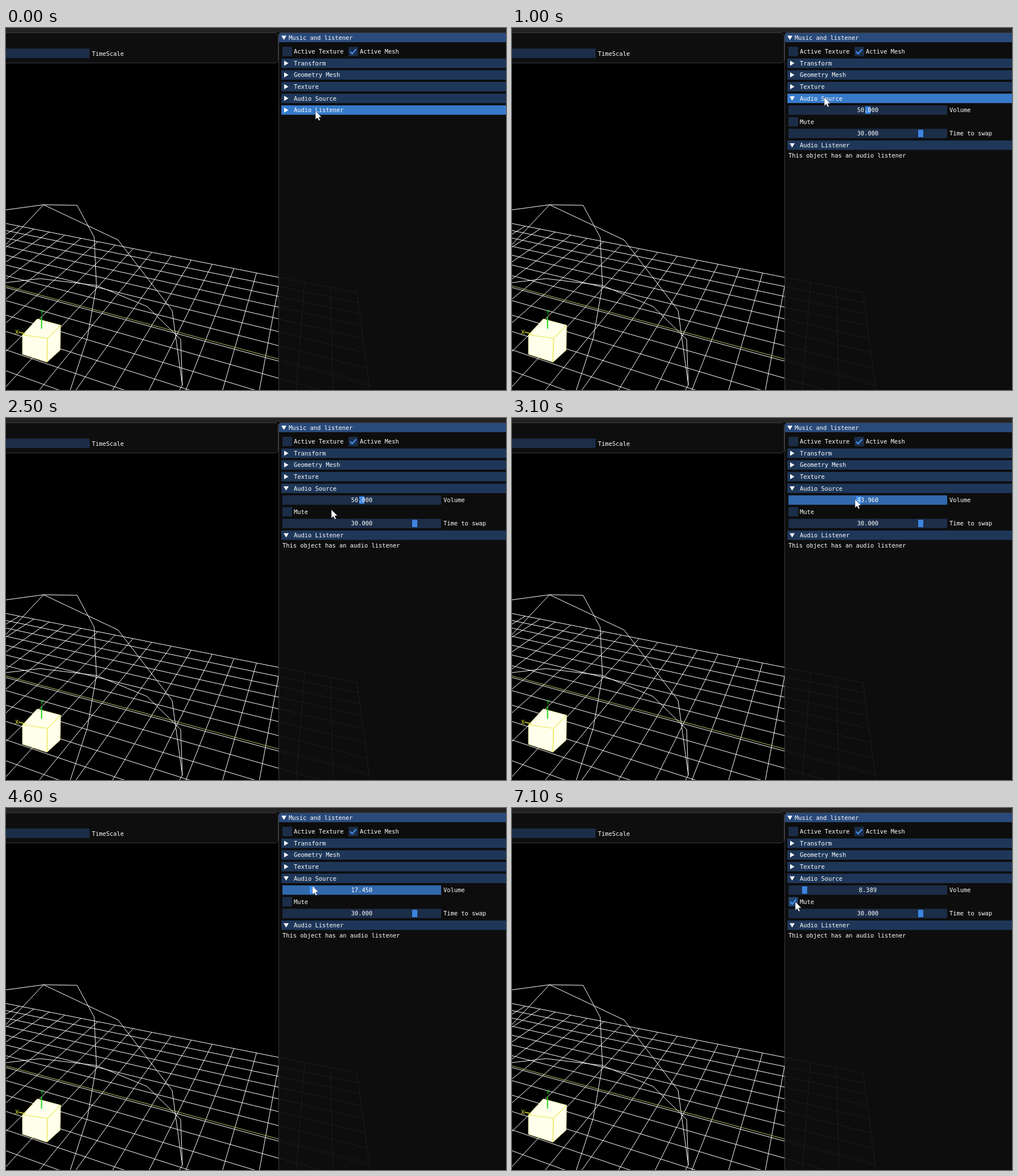
An HTML page with a canvas that plays this animation: 879 px wide and 637 px high, repeating every 7.2 s.

```html
<!DOCTYPE html>
<html lang="en">
<head>
<meta charset="utf-8">
<title>Audio inspector</title>
<style>
html, body { margin: 0; width: 100%; height: 100%; overflow: hidden; background: #000; }
canvas { display: block; }
</style>
</head>
<body>
<canvas id="stage" width="879" height="637"></canvas>
<script>
const ctx = document.getElementById('stage').getContext('2d');
const LOOP = 7200, STEP = 100;
const COLOR = {
  header: '#1e3759', headerHover: '#367ac9',
  frame: '#1c2d48', frameHover: '#23456d', frameActive: '#3169ac',
  grab: '#3d85e0', accent: '#4296fa', border: '#3c3c43'
};
const ROW = 20.6, BAR = 16.6, FIRST_ROW = 62;
const rowY = i => FIRST_ROW + i * ROW;

// Places the pointer visits; it moves evenly from one to the next.
const stops = [
  { at: 0, x: 544, y: 146 },
  { at: 400, x: 544, y: 146 },
  { at: 800, x: 549, y: 122 },
  { at: 1100, x: 549, y: 122 },
  { at: 1900, x: 491, y: 187 },
  { at: 2900, x: 626, y: 144 },
  { at: 3200, x: 591.6, y: 142.5 },
  { at: 4400, x: 538.592, y: 137 },
  { at: 4600, x: 538.592, y: 137 },
  { at: 4750, x: 514.399, y: 138 },
  { at: 4900, x: 514.399, y: 138 },
  { at: 5400, x: 496, y: 160 },
  { at: 5900, x: 498, y: 165 },
  { at: LOOP, x: 498, y: 165 }
];
const TIMES = { listener: 200, source: 900, drag: 2900, release: 4900, mute: 5900 };
const SLIDER = { zero: 492, unit: 2.67, lag: 55 };

function pointer(t) {
  const i = Math.max(1, stops.findIndex(s => s.at >= t));
  const a = stops[i - 1], b = stops[i];
  const k = (t - a.at) / (b.at - a.at);
  return { x: a.x + (b.x - a.x) * k, y: a.y + (b.y - a.y) * k };
}

// The dragged value trails the pointer and stays where it was let go.
function volumeAt(t) {
  if (t < TIMES.drag) return 50;
  const { x } = pointer(Math.min(t, TIMES.release) - SLIDER.lag);
  return Math.min(50, (x - SLIDER.zero) / SLIDER.unit);
}

function rect(x, y, w, h, color) {
  ctx.fillStyle = color;
  ctx.fillRect(x, y, w, h);
}

function trace(points) {
  ctx.beginPath();
  points.forEach(([x, y]) => ctx.lineTo(x, y));
}

function line(points, color = '#fff', width = 1) {
  trace(points);
  ctx.strokeStyle = color;
  ctx.lineWidth = width;
  ctx.stroke();
}

function shape(points, color) {
  trace(points);
  ctx.fillStyle = color;
  ctx.fill();
}

function text(str, x, cy, color = '#fff', align = 'left') {
  ctx.font = '10.4px "DejaVu Sans Mono", monospace';
  ctx.textAlign = align;
  ctx.fillStyle = color;
  ctx.fillText(str, x, cy + 3.7);
}

// Perspective of the floor: its far right corner and two vanishing points.
function ground(u, v) {
  const a = u * 0.0386, b = v * 0.02212, w = 1 - a + b;
  return [(617 - a * 558 - b * 1555) / w, (466 - a * 25 + b * 36.6) / w];
}

function drawFloor() {
  for (let i = 0; i <= 20; i++) {
    line([ground(0, i), ground(20, i)]);
    line([ground(i, 0), ground(i, 30)]);
  }
  line([ground(6.87, 0), ground(6.87, 30)], '#c4c46a');
}

function drawSphere() {
  line([[0, 320], [66, 311], [125, 312], [155, 368], [159, 453], [143, 545], [113, 637]]);
  line([[0, 381], [66, 311], [197, 373], [292, 497], [310, 628], [307, 548],
    [248, 490], [159, 453], [60, 441], [0, 448]]);
  line([[310, 628], [305, 637]]);
}

function drawCube() {
  const left = [29, 540], right = [96, 523], near = [73, 546], base = [72, 588];
  const outline = [[55, 512], right, [95, 567], base, [29, 574], left, [55, 512]];
  shape(outline, '#ffffec');
  line(outline, '#f6f6a0');
  line([left, near, right], '#eeee78', 1.5);
  line([near, base], '#eeee78', 2);
  line([[62.5, 508], [62.5, 529]], '#20d020', 2);
  line([[22, 535], [34, 538]], '#dede30', 1.5);
  text('Y', 60, 500, '#20d020');
  text('X', 16, 535, '#e6e63c');
}

function arrow(cy, open, x = 492.5) {
  shape(open ? [[x - 4.5, cy - 3.5], [x + 4.5, cy - 3.5], [x, cy + 4]]
    : [[x - 3.5, cy - 4.5], [x + 4, cy], [x - 3.5, cy + 4.5]], '#fff');
}

const bar = (x, cy, w, color) => rect(x, cy - BAR / 2, w, BAR, color);

function header(label, cy, open, hover) {
  bar(484, cy, 395, hover ? COLOR.headerHover : COLOR.header);
  arrow(cy, open);
  text(label, 506, cy);
}

function checkbox(label, x, cy, checked, hover) {
  bar(x, cy, 17, hover ? COLOR.frameHover : COLOR.frame);
  if (checked) line([[x + 3, cy], [x + 6.5, cy + 4], [x + 13.5, cy - 4]], COLOR.accent, 2.2);
  text(label, x + 20, cy);
}

function slider(label, cy, value, grabX, hover, active) {
  bar(486, cy, 279, active ? COLOR.frameActive : hover ? COLOR.frameHover : COLOR.frame);
  rect(grabX - 4.5, cy - 6.5, 9, 13, active ? COLOR.accent : COLOR.grab);
  text(value.toFixed(3), 625.5, cy, '#fff', 'center');
  text(label, 769, cy);
}

function drawWindows() {
  ctx.beginPath();
  ctx.roundRect(-20, 8.5, 498.5, 53, 6);
  ctx.fillStyle = 'rgba(15,15,15,.94)';
  ctx.fill();
  ctx.strokeStyle = COLOR.border;
  ctx.lineWidth = 1;
  ctx.stroke();
  bar(0, 44.5, 147, COLOR.frame);
  text('TimeScale', 151, 45);

  rect(479, 9, 400, 628, 'rgba(14,14,14,.94)');
  rect(480, 9, 399, 16, '#294a7a');
  line([[479.5, 637], [479.5, 12], [482, 8.5], [879, 8.5]], COLOR.border);
  rect(0, 0, 879, 8, '#232323');
  arrow(17, true, 488.5);
  text('Music and listener', 497, 17);
}

function drawInspector(t, mouse) {
  const dragging = t >= TIMES.drag && t < TIMES.release;
  const sourceOpen = t >= TIMES.source, listenerOpen = t >= TIMES.listener;
  const over = (y, right = 879) =>
    !dragging && Math.abs(mouse.y - y) <= BAR / 2 && mouse.x >= 484 && mouse.x <= right;

  checkbox('Active Texture', 486, rowY(-1), false);
  checkbox('Active Mesh', 602, rowY(-1), true);
  ['Transform', 'Geometry Mesh', 'Texture'].forEach((label, i) => header(label, rowY(i), false));
  header('Audio Source', rowY(3), sourceOpen, over(rowY(3)));

  if (sourceOpen) {
    const volume = volumeAt(t);
    const grabX = SLIDER.zero + volume * SLIDER.unit;
    slider('Volume', rowY(4), volume, grabX, over(rowY(4), 765), dragging);
    checkbox('Mute', 486, rowY(5), t >= TIMES.mute, over(rowY(5), 531));
    slider('Time to swap', rowY(6), 30, 718.5, over(rowY(6), 765));
  }
  const listenerY = rowY(sourceOpen ? 7 : 4);
  header('Audio Listener', listenerY, listenerOpen, over(listenerY));
  if (listenerOpen) text('This object has an audio listener', 486, listenerY + 18);
}

function drawPointer({ x, y }) {
  const outline = [[0, 0], [0, 15], [3.5, 12], [6, 17], [8.3, 16], [6, 11], [10.6, 10.6], [0, 0]]
    .map(([dx, dy]) => [x + dx, y + dy]);
  shape(outline, '#fff');
  line(outline, 'rgba(20,30,45,.7)', 0.7);
}

function render(elapsed) {
  const t = Math.floor(elapsed % LOOP / STEP) * STEP;
  const mouse = pointer(t);
  rect(0, 0, 879, 637, '#000');
  drawFloor();
  drawSphere();
  drawCube();
  drawWindows();
  drawInspector(t, mouse);
  drawPointer(mouse);
}

let start;
function tick(now) {
  start ??= now;
  render(now - start);
  requestAnimationFrame(tick);
}
render(0);
requestAnimationFrame(tick);
</script>
</body>
</html>
```
